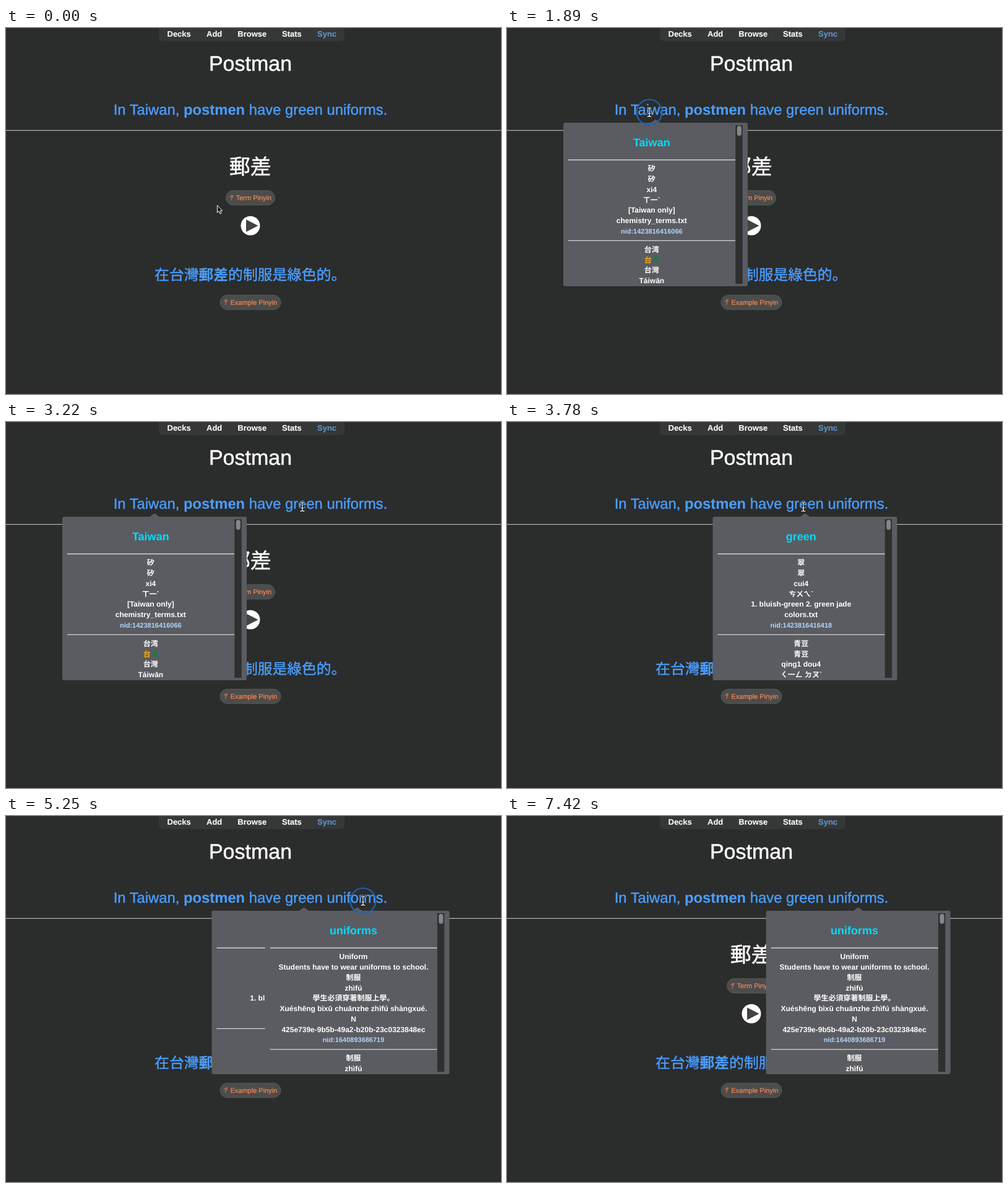
An HTML page for the animation above (7.77 s loop, 800 px wide and 591 px high).

```html
<!DOCTYPE html>
<html lang="en">
<head>
<meta charset="utf-8">
<title>Flashcard word lookup</title>
<style>
  html, body { margin: 0; width: 100%; height: 100%; overflow: hidden; background: #2b2c2c; }
  svg { display: block; width: 100%; height: 100%; }
  text {
    font-family: "Liberation Sans", "Noto Sans CJK JP", "Noto Sans CJK TC", sans-serif;
    white-space: pre; text-rendering: geometricPrecision;
  }
  .mid { text-anchor: middle; }
  .bold { font-weight: 700; }
  .nav { font-size: 13px; fill: #f4f4f4; stroke: #f4f4f4; stroke-width: .2; }
  .nav .sync { fill: #5d8fc6; stroke: #5d8fc6; }
  .term { font-size: 34px; fill: #fff; stroke: #fff; stroke-width: .5; }
  .han { font-weight: 500; }
  .example { font-size: 23.8px; fill: #4a9eff; stroke: #4a9eff; stroke-width: .4; }
  .example .bold { stroke-width: .1; }
  .pill rect { fill: #4b4c4c; stroke: #626363; stroke-dasharray: 2 1; }
  .pill text { font-size: 11px; fill: #fb8850; stroke: #fb8850; stroke-width: .2; }
  .pill path { fill: none; stroke: #d9714a; stroke-width: 1.1; }

  .panel { fill: #5b5c61; }
  .track { fill: #2e2f2f; }
  .thumb { fill: #85868a; }
  .rule { stroke: #d2d3d5; stroke-width: 1.4; }
  .head { font-size: 18px; fill: #00dcff; }
  .row { font-size: 12px; fill: #fff; }
  .id { font-size: 11px; fill: #b0d4ff; }

  .popup { visibility: hidden; animation: 7770ms step-end infinite; }
  #taiwan { animation-name: taiwan; }
  #green { animation-name: green; }
  #uniforms { animation-name: uniforms; }
  @keyframes taiwan { 24.3% { visibility: visible } 47.7%, 100% { visibility: hidden } }
  @keyframes green { 45.9% { visibility: visible } 70.2%, 100% { visibility: hidden } }
  @keyframes uniforms { 67.5% { visibility: visible } 100% { visibility: hidden } }

  #cursor { animation: move 7770ms ease-in-out infinite; }
  @keyframes move {
    0% { transform: translate(341px, 286px) }
    8.1%, 13.6% { transform: translate(229px, 135px) }
    16%, 30.9% { transform: translate(230px, 136px) }
    41.4%, 54.2% { transform: translate(479px, 137px) }
    58.5% { transform: translate(577px, 137px) }
    91.1% { transform: translate(577px, 137px); animation-timing-function: ease-in }
    95.2%, 100% { transform: translate(600px, 620px) }
  }
  #arrow { animation: arrow 7770ms step-end infinite; }
  #beam { animation: beam 7770ms step-end infinite; }
  #ring { animation: ring 7770ms step-end infinite; fill: none; stroke: #1f62b0; stroke-width: 2.2; }
  @keyframes arrow { 0%, 92.2% { opacity: 1 } 6.2% { opacity: 0 } }
  @keyframes beam { 0%, 92.2%, 100% { opacity: 0 } 6.2% { opacity: 1 } }
  @keyframes ring {
    0%, 25.2%, 46.8%, 68.4%, 100% { opacity: 0 }
    22.5%, 44.1%, 65.7% { opacity: 1 }
  }
</style>
</head>
<body>
<svg viewBox="0 0 800 591">
  <path d="M247 0H547V15a6 6 0 0 1-6 6H253a6 6 0 0 1-6-6Z" fill="#363737"/>
  <g class="nav bold">
    <text x="260.5" y="14">Decks</text>
    <text x="324" y="14">Add</text>
    <text x="374.3" y="14">Browse</text>
    <text x="446" y="14">Stats</text>
    <text x="503" y="14" class="sync">Sync</text>
  </g>

  <text class="term mid" x="395" y="69">Postman</text>
  <text class="example mid" x="395" y="140">In Taiwan, <tspan class="bold">postmen</tspan> have green uniforms.</text>
  <path d="M0 165.4H800" stroke="#b0b0b0" stroke-width="1.4"/>
  <text class="term han mid" x="394.8" y="236">郵差</text>

  <g class="pill">
    <rect x="355.5" y="262.5" width="79" height="23.5" rx="11.7"/>
    <path id="mark" d="M364 278.5Q365.5 274 364.8 269.5M361.5 273.5Q364 270.5 368 270.5M364.8 274L367 272.5"/>
    <text x="371.7" y="278">Term Pinyin</text>
  </g>
  <circle cx="395" cy="319.3" r="15.5" fill="#fff"/>
  <path d="M388 309.3V329.3L407.5 319.3Z" fill="#424343"/>

  <text class="example han mid" x="394.8" y="406.7">在台灣<tspan class="bold">郵差</tspan>的制服是綠色的。</text>
  <g class="pill">
    <rect x="346" y="431.3" width="98" height="23.5" rx="11.7"/>
    <use href="#mark" x="-9.5" y="168.5"/>
    <text x="362.5" y="447">Example Pinyin</text>
  </g>

  <g id="popups"></g>

  <g id="cursor">
    <circle id="ring" r="20.5"/>
    <path id="arrow" d="M0.5 0.5V12.2L3.2 9.7L5.2 14L7.2 13.1L5.3 9H8.8Z" fill="#111" stroke="#fff"/>
    <g id="beam" fill="none" stroke-linecap="round">
      <g stroke="#111" stroke-width="3"><use href="#bar"/></g>
      <g stroke="#fff" stroke-width="1.2"><use href="#bar"/></g>
    </g>
  </g>

  <defs>
    <path id="bar" d="M-3-7.2Q0-7.2 0-5V5Q0 7.2-3 7.2M3-7.2Q0-7.2 0-5V5Q0 7.2 3 7.2M-1.8 2H1.8"/>
    <clipPath id="view"><rect x="95" y="157" width="275" height="256"/></clipPath>
  </defs>
</svg>
<script>
  const ROW = 16.75;
  const popups = [
    { word: "Taiwan", dx: 0, rows: [
      "矽", "矽", "xi4", "ㄒ一`", "[Taiwan only]", "chemistry_terms.txt", "nid:1423816416066",
      "台湾", '<tspan fill="#ffab0a">台</tspan><tspan fill="#137c4b">湾</tspan>', "台灣", "Táiwān"] },
    { word: "green", dx: 241.5, rows: [
      "翠", "翠", "cui4", "ㄘㄨㄟ`", "1. bluish-green 2. green jade", "colors.txt", "nid:1423816416418",
      "青豆", "青豆", "qing1 dou4", "ㄑ一ㄥ ㄉㄡ`"] },
    { word: "uniforms", dx: 327.7, rows: [
      "Uniform", "Students have to wear uniforms to school.", "制服", "zhìfú", "學生必須穿著制服上學。",
      "Xuéshēng bìxū chuānzhe zhìfú shàngxué.", "N", "425e739e-9b5b-49a2-b20b-23c0323848ec",
      "nid:1640893686719", "制服", "zhìfú"] }
  ];

  const rule = y => `<path class="rule" d="M99 ${y}H369"/>`;

  function entries(rows) {
    let y = 231.3;
    return rows.map(text => {
      const isId = text.startsWith("nid:");
      const line = `<text class="${isId ? "id" : "row"} mid bold" x="233.8" y="${y}">${text}</text>`;
      const end = isId ? rule(y + 11.6) : "";
      y += isId ? 30 : ROW;
      return line + end;
    }).join("");
  }

  document.getElementById("popups").innerHTML = popups.map(({ word, dx, rows }) => `
    <g class="popup" id="${word.toLowerCase()}" transform="translate(${dx})">
      <path class="panel" d="M231.5 153.5L240 147.5L248.5 153.5Z"/>
      <rect class="panel" x="91" y="153" width="298" height="264" rx="3"/>
      <rect class="track" x="369.3" y="157" width="11.4" height="256"/>
      <rect class="thumb" x="371.8" y="158" width="7" height="16" rx="3.5"/>
      <text class="head mid bold" x="233.8" y="191">${word}</text>
      ${rule(213)}
      <g clip-path="url(#view)">${entries(rows)}</g>
    </g>`).join("");
</script>
</body>
</html>
```
